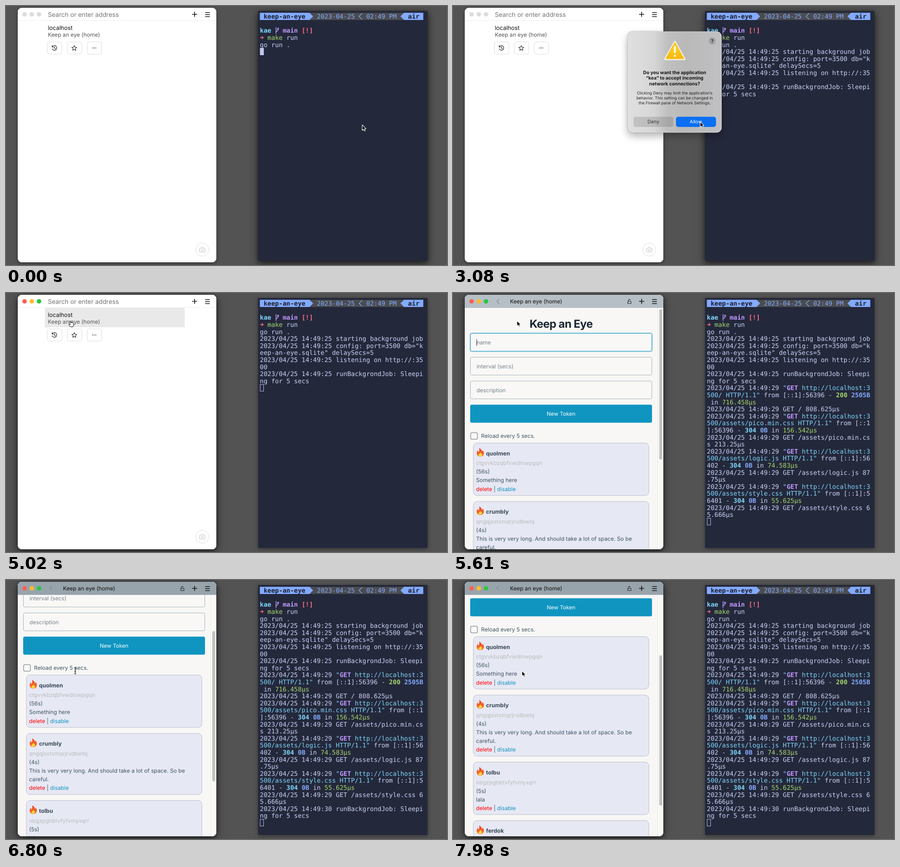
Animation, 975 px wide and 574 px high, one loop 8000 ms. Source, as an HTML page:

```html
<!DOCTYPE html>
<html lang="en">
<head>
<meta charset="utf-8">
<title>Keep an eye</title>
<style>
  html, body { margin: 0; width: 100%; height: 100%; overflow: hidden; background: #535353; }
  svg { display: block; width: 975px; height: 574px; }
  text { font-family: Inter, "Noto Sans", sans-serif; white-space: pre; text-rendering: geometricPrecision; }
  .mono { font: 13.95px "DejaVu Sans Mono", monospace; }
  .near { filter: drop-shadow(0 2px 5px rgba(0, 0, 0, .4)); }
  .far { filter: drop-shadow(0 6px 10px rgba(0, 0, 0, .5)); }
  .dialog { filter: drop-shadow(0 8px 9px rgba(0, 0, 0, .22)) drop-shadow(0 0 1px rgba(0, 0, 0, .4)); }
</style>
</head>
<body>
<svg id="stage" viewBox="0 0 975 574">
  <defs>
    <clipPath id="window"><rect x="26" y="4" width="439" height="564" rx="9"/></clipPath>
    <clipPath id="view"><rect x="26" y="33" width="439" height="535"/></clipPath>
    <linearGradient id="glass">
      <stop offset="0" stop-color="#e0e0e0"/><stop offset=".28" stop-color="#d6d6d6"/>
      <stop offset=".42" stop-color="#c0c0c0"/><stop offset=".62" stop-color="#b9b9b9"/>
      <stop offset="1" stop-color="#c0c0c4"/>
    </linearGradient>
    <linearGradient id="amber" x2="0" y2="1">
      <stop offset="0" stop-color="#ffdc3c"/><stop offset="1" stop-color="#f5b50a"/>
    </linearGradient>
    <linearGradient id="blaze" x2="0" y2="1">
      <stop offset="0" stop-color="#e8402a"/><stop offset="1" stop-color="#fb7a1c"/>
    </linearGradient>
    <g id="flame">
      <path fill="url(#blaze)" d="M6 0C11 3 12 6 12 8Q13.500 7 13.500 4.500C16 8 17 11 16 14Q14 19 8.500 19Q2 19 .5 13.500C0 10 1 7 3 5Q3 8 4.500 9Q7 6 6 0Z"/>
      <path fill="#ffd84a" d="M8.500 9.500C9 12 13 13 12 16Q11 18.500 8.500 18.500Q5 18.500 4.500 16C4.500 13 8 13 8.500 9.500Z"/>
    </g>
  </defs>
</svg>
<script>
const LOOP = 8000;
const stage = document.getElementById('stage');

function add(parent, tag, attrs = {}, content) {
  const node = document.createElementNS('http://www.w3.org/2000/svg', tag);
  for (const key in attrs) node.setAttribute(key, attrs[key]);
  if (content !== undefined) node.textContent = content;
  parent.append(node);
  return node;
}
const group = (parent, attrs) => add(parent, 'g', attrs);
const rect = (parent, x, y, width, height, fill, attrs) =>
  add(parent, 'rect', { x, y, width, height, fill, ...attrs });
const path = (parent, d, stroke, width = 1.2, fill = 'none') =>
  add(parent, 'path', { d, stroke, fill, 'stroke-width': width, 'stroke-linecap': 'round', 'stroke-linejoin': 'round' });
const circle = (parent, cx, cy, r, fill, attrs) => add(parent, 'circle', { cx, cy, r, fill, ...attrs });
// y is the middle of the capitals
const label = (parent, x, y, size, fill, content, attrs) =>
  add(parent, 'text', { x, y: y + size * .365, 'font-size': size, fill, ...attrs }, content);

// Hold each value until the next step
function play(node, prop, steps) {
  const frames = steps.map(([t, v]) => ({ [prop]: v, offset: t / LOOP, easing: 'step-end' }));
  frames.push({ [prop]: steps[steps.length - 1][1], offset: 1 });
  node.animate(frames, { duration: LOOP, iterations: Infinity });
}
function show(node, ...spans) {
  const steps = spans[0][0] ? [[0, 0]] : [];
  for (const [from, to = LOOP] of spans) {
    steps.push([from, 1]);
    if (to < LOOP) steps.push([to, 0]);
  }
  play(node, 'opacity', steps);
  return node;
}

// Window shadows
const TERM = [557.5, 11, 374.5, 554, '#24283b'];
const WIN = [26, 4, 439, 564, '#fff'];
rect(stage, ...TERM, { class: 'near' });
show(rect(stage, ...TERM, { class: 'far' }), [0, 3530]);
rect(stage, ...WIN, { rx: 9, class: 'near' });
show(rect(stage, ...WIN, { rx: 9, class: 'far' }), [3530]);

// Terminal
const COLS = 43, CELL = 8.3986, LINE = 15.6, LEFT = 561.3, TOP = 23;
const INK = { fg: '#c8d3f5', blue: '#82aaff', cyan: '#7fd6fb', purple: '#c099ff', red: '#ff6c86', green: '#a5d86e', dark: '#1b1d2b' };
const colX = col => LEFT + col * CELL;
const rowY = row => TOP + row * LINE;

function cells(parent, col, row, content, ink = 'fg', bold) {
  add(parent, 'text', { class: 'mono', x: colX(col), y: rowY(row) + 5.1, fill: INK[ink],
    style: bold ? 'font-weight:bold' : '' }, content);
}

const term = group(stage);
rect(term, ...TERM);
rect(term, LEFT, 15, 361.200, 16, '#4b4c50');
path(term, 'M561.300 15H671L679 23L671 31H561.300Z', 'none', 0, INK.blue);
path(term, 'M922.500 15H880L872 23L880 31H922.500Z', 'none', 0, INK.blue);
path(term, 'M787 16.500L780.500 23L787 29.500', INK.blue);
cells(term, 1, 0, 'keep-an-eye', 'dark', true);
cells(term, 15, 0, '2023-04-25', 'blue');
cells(term, 28, 0, '02:49 PM', 'blue');
cells(term, 39, 0, 'air', 'dark', true);
cells(term, 0, 2, 'kae', 'cyan', true);
path(term, 'M597 47.500V61M601.500 50V52Q601.500 55 597 57M599.800 51L601.500 48.800L603 51', INK.purple, 1.5);
cells(term, 6, 2, 'main', 'purple', true);
cells(term, 11, 2, '[!]', 'red', true);
path(term, 'M562.500 70H568.500M566 67.500L568.800 70L566 72.500', INK.red, 1.5);
cells(term, 2, 3, 'make', 'green');
cells(term, 7, 3, 'run');
cells(term, 0, 4, 'go run .');

const stamp = secs => [`2023/04/25 14:49:${secs} `];
const note = (secs, content) => [stamp(secs), [content]];
function request(url, port, status, size, took, total) {
  return [[
    stamp(29), ['"', 'cyan'], ['GET', 'purple', true], [` http://localhost:3500${url} HTTP/1.1"`, 'cyan'],
    [` from [::1]:${port} - `], [status, status === '200' ? 'green' : 'cyan', true], [' '],
    [size, 'blue', true], [' in '], [took + 'µs', 'green']
  ], note(29, `GET ${url} ${total}µs`)];
}

const sleeping = 'runBackgrondJob: Sleeping for 5 secs';
const output = [
  [1640, [note(25, 'starting background job'),
    note(25, 'config: port=3500 db="keep-an-eye.sqlite" delaySecs=5'),
    note(25, 'listening on http://:3500'), note(25, sleeping)]],
  [5170, request('/', 56396, '200', '2505B', '716.458', '808.625')],
  [5460, [...request('/assets/pico.min.css', 56396, '304', '0B', '156.542', '213.25'),
    ...request('/assets/logic.js', 56402, '304', '0B', '74.583', '87.75'),
    ...request('/assets/style.css', 56401, '304', '0B', '55.625', '65.666')]],
  [6650, [note(30, sleeping)]]
];

let row = 5;
const prompt = [[0, 'translate(0px,0px)']];
for (const [time, lines] of output) {
  const block = show(group(term), [time]);
  for (const line of lines) {
    let col = 0;
    for (let [content, ink, bold] of line) {
      while (content) {
        if (col === COLS) { col = 0; row++; }
        const part = content.slice(0, COLS - col);
        cells(block, col, row, part, ink, bold);
        col += part.length;
        content = content.slice(part.length);
      }
    }
    row++;
  }
  prompt.push([time, `translate(0px,${(row - 5) * LINE}px)`]);
}
const caret = group(term);
show(rect(caret, 561.5, 93, 8.5, 16, '#c0c8f0'), [0, 3530]);
show(rect(caret, 562, 93.5, 7.5, 15, 'none', { stroke: '#c0c8f0' }), [3530]);
play(caret, 'transform', prompt);

// Browser
const win = group(stage, { 'clip-path': 'url(#window)' });
rect(win, ...WIN);

const home = show(group(win), [0, 5170]);
rect(home, 26, 32, 439, 1, '#ececec');
show(rect(home, 86, 33, 309, 43, '#e9e9e9'), [4870, 5170]);
label(home, 92.5, 18.5, 13.8, '#757575', 'Search or enter address');
show(rect(home, 93, 9, 1, 17, '#222'), [3530, 3980], [4420, 4870]);
label(home, 92.5, 48.5, 12.8, '#111', 'localhost');
label(home, 92.5, 63.5, 12.2, '#555', 'Keep an eye (home)');
for (const x of [91, 135, 179])
  rect(home, x + .5, 79.5, 32, 27, '#fff', { rx: 4, stroke: '#dcdcdc' });
path(home, 'M102.300 90.500A5.200 5.200 0 1 1 102.200 95M102 87.500V90.800H105.200M107.300 90.200V93.500L109.500 94.700', '#222');
const star = Array.from({ length: 10 }, (_, i) => {
  const r = i % 2 ? 2.7 : 5.9, a = i * Math.PI / 5;
  return `${151 + r * Math.sin(a)} ${93.5 - r * Math.cos(a)}`;
});
path(home, `M${star.join('L')}Z`, '#222', 1.1);
for (const x of [191.5, 195, 198.5]) circle(home, x, 93, .9, '#222');
circle(home, 434, 540, 14.5, '#fff', { stroke: '#dcdcdc' });
path(home, 'M428 537H430.500L432 535H436L437.500 537H440V545H428Z', '#c4c4c4', 1.1);
circle(home, 434, 540.7, 2.3, 'none', { stroke: '#c4c4c4' });

// Page
const page = show(group(win), [5460]);
rect(page, 26, 33, 439, 535, '#f8f7f5');
const view = group(page, { 'clip-path': 'url(#view)' });
const body = group(view);
const middle = { 'text-anchor': 'middle' };
label(body, 239, 68, 24.5, '#1b2832', 'Keep an Eye', { ...middle, 'font-weight': 700, 'letter-spacing': -.6 });
['name', 'interval (secs)', 'description'].forEach((hint, i) => {
  const y = 89.5 + i * 52.8;
  if (!i) rect(body, 37.5, 88.5, 403.5, 41.5, 'none', { rx: 4, stroke: '#1095c1', 'stroke-opacity': .25, 'stroke-width': 2 });
  rect(body, 38.5, y, 401, 39.5, '#f9f8f6', { rx: 3, stroke: i ? '#a2afb9' : '#1095c1' });
  label(body, 52, y + 20, 12.2, '#73828c', hint);
});
show(rect(body, 52, 102, 1, 15, '#333'), [5460, 6050]);
rect(body, 38, 247.5, 402, 40, '#1095c1', { rx: 3.5 });
label(body, 239, 267.5, 12, '#fff', 'New Token', middle);
rect(body, 39, 309.5, 15, 14.5, '#f9f8f6', { rx: 3, stroke: '#8b98a2', 'stroke-width': 1.5 });
label(body, 62, 316.5, 12.2, '#415462', 'Reload every 5 secs.');

const tokens = [
  ['quolmen', 'ctgvvkbzqbfvwdmwpgqn', 56, 'Something here'],
  ['crumbly', 'qngqjsstxmqrjrvdbwtq', 4, 'This is very very long. And should take a lot of space. So be', 'careful.'],
  ['tolbu', 'nbgzpghbtvfyfvmyxqrr', 5, 'lala'],
  ['ferdok', 'wkzphdtqnvbxrjmclsgf', 9, 'lala']
];
let y = 332.5;
for (const [name, key, secs, ...lines] of tokens) {
  const height = 97.2 + lines.length * 19.1;
  rect(body, 45, y, 388, height, '#e6e8f4', { rx: 8, stroke: '#b9bccb' });
  add(body, 'use', { href: '#flame', x: 52, y: y + 11 });
  label(body, 73, y + 22.5, 12.4, '#374956', name, { 'font-weight': 700 });
  label(body, 51, y + 44.5, 12.2, '#bcbcbc', key);
  label(body, 51, y + 63.5, 12.2, '#415462', `(${secs}s)`);
  lines.forEach((line, i) => label(body, 51, y + 82.5 + i * 19.1, 12.2, '#415462', line));
  const links = label(body, 51, y + height - 14.5, 12.2, '#415462', '');
  add(links, 'tspan', { fill: '#f00' }, 'delete');
  add(links, 'tspan', {}, ' | ');
  add(links, 'tspan', { fill: '#1095c1' }, 'disable');
  y += height + 13.2;
}

rect(page, 452.5, 33, 12.5, 535, '#faf9f8');
rect(page, 452, 33, 1, 535, '#ecebea');
const thumb = rect(page, 456, 36, 6.5, 333, '#c1c1c1', { rx: 3.2 });
const scroll = [[0, 0], [6650, 45], [6800, 122], [6950, 165], [7100, 190], [7240, 203], [7390, 210], [7840, 209], [7980, 207]];
play(body, 'transform', scroll.map(([t, s]) => [t, `translate(0px,${-s}px)`]));
play(thumb, 'transform', scroll.map(([t, s]) => [t, `translate(0px,${s * .633}px)`]));

// Title bar
show(rect(win, 26, 4, 439, 29, '#b6bfc6'), [5460, 6650]);
show(rect(win, 26, 4, 439, 29, '#98a4ac'), [6650]);
const title = show(group(win), [5170]);
path(title, 'M102 13.500L97 18.500L102 23.500', '#7d868c', 1.1);
label(title, 126, 19, 12.2, '#111', 'Keep an eye (home)');
path(title, 'M386.500 18.500H393.500V23.500H386.500ZM388 18.300V16Q390 12.500 392 15.500', '#222', 1.1);
[['#ff5f57', 41], ['#febc2e', 57], ['#28c840', 73]].forEach(([color, x]) => {
  show(circle(win, x, 18.5, 5, '#dcdcdc'), [0, 3530]);
  show(circle(win, x, 18.5, 5, color), [3530]);
});
path(win, 'M412 18.500H422M417 13.500V23.500', '#111', 1.6);
path(win, 'M441 14.500H450M441 19H450M441 23.500H450', '#111', 1.7);

// Firewall dialog
const dialog = show(group(stage), [1790, 3380]);
rect(dialog, 386, 56.5, 208, 224, '#c8c8c8', { rx: 11, class: 'dialog' });
rect(dialog, 386.5, 57, 207, 223, 'url(#glass)', { rx: 11, stroke: '#e4e4e4', 'stroke-opacity': .7 });
circle(dialog, 573, 77.5, 8, '#a5a5a8');
label(dialog, 573, 77.5, 11.5, '#222', '?', { ...middle, 'font-weight': 600 });
path(dialog, 'M490.500 80L511.500 117.500H469.500Z', '#f4f1e6', 5, 'url(#amber)');
path(dialog, 'M490.500 81.500L510 116.500H471Z', '#f7bf18', 2, 'url(#amber)');
path(dialog, 'M490.500 91V103', '#fff', 3.6);
circle(dialog, 490.5, 110.5, 2.2, '#fff');
['Do you want the application', '“kea” to accept incoming', 'network connections?'].forEach((line, i) =>
  label(dialog, 490, 147 + i * 12.7, 10.3, '#151515', line, { ...middle, 'font-weight': 700 }));
['Clicking Deny may limit the application’s', 'behavior. This setting can be changed in', 'the Firewall pane of Network Settings.'].forEach((line, i) =>
  label(dialog, 490, 192.3 + i * 11.2, 8.85, '#222', line, middle));
rect(dialog, 399, 245.5, 88, 22.5, '#000', { rx: 5, 'fill-opacity': .13 });
label(dialog, 443, 256.5, 10.6, '#333', 'Deny', middle);
rect(dialog, 493, 245.5, 88.500, 22.5, '#0a6ff2', { rx: 5 });
show(rect(dialog, 493, 245.5, 88.500, 22.5, '#0657c8', { rx: 5 }), [3230, 3380]);
label(dialog, 537, 256.5, 10.6, '#fff', 'Allow', middle);

// Pointer
const pointer = group(stage);
const shapes = { arrow: group(pointer), hand: group(pointer), beam: group(pointer) };
path(shapes.arrow, 'M.5 .5V12.500L3.300 10L5.200 14L7.200 13.100L5.400 9.200H9Z', '#fff', 1.1, '#000');
path(shapes.hand, 'M-.5 1Q.5 0 1.300 1L2.800 5Q4 3.500 5 5Q6.300 4 7 5.600Q8.500 5 8.500 7V10L7 14H1.500L-2 9.500Q-2.500 8 -1 8L.8 9Z', '#000', 1, '#fff');
path(shapes.beam, 'M-2 -6.500Q0 -6.500 0 -5Q0 -6.500 2 -6.500M0 -5V5.500M-2 7Q0 7 0 5.500Q0 7 2 7M-1.500 2H1.500', '#111', 1.1);
const moves = [
  [0, 787, 263], [150, 745, 232], [300, 680, 185], [450, 657, 168],
  [2030, 636, 188], [2180, 600, 220], [2480, 586, 232], [2630, 568, 246], [2780, 553, 254], [2930, 546, 256],
  [4420, 515, 240], [4570, 385, 172], [4720, 235, 102], [4870, 156, 68, 'hand'], [5020, 141, 61, 'hand'],
  [5460, 141, 61], [5760, 142, 72], [5910, 145, 108, 'beam'], [6050, 149, 155, 'beam'], [6200, 152, 190],
  [6350, 153, 201, 'beam'], [6650, 152, 201], [6800, 153, 201, 'beam'], [6950, 152, 201]
];
play(pointer, 'transform', moves.map(([t, x, y]) => [t, `translate(${x}px,${y}px)`]));
for (const kind in shapes)
  play(shapes[kind], 'opacity', moves.map(([t, , , shape = 'arrow']) => [t, +(shape === kind)]));
</script>
</body>
</html>
```
